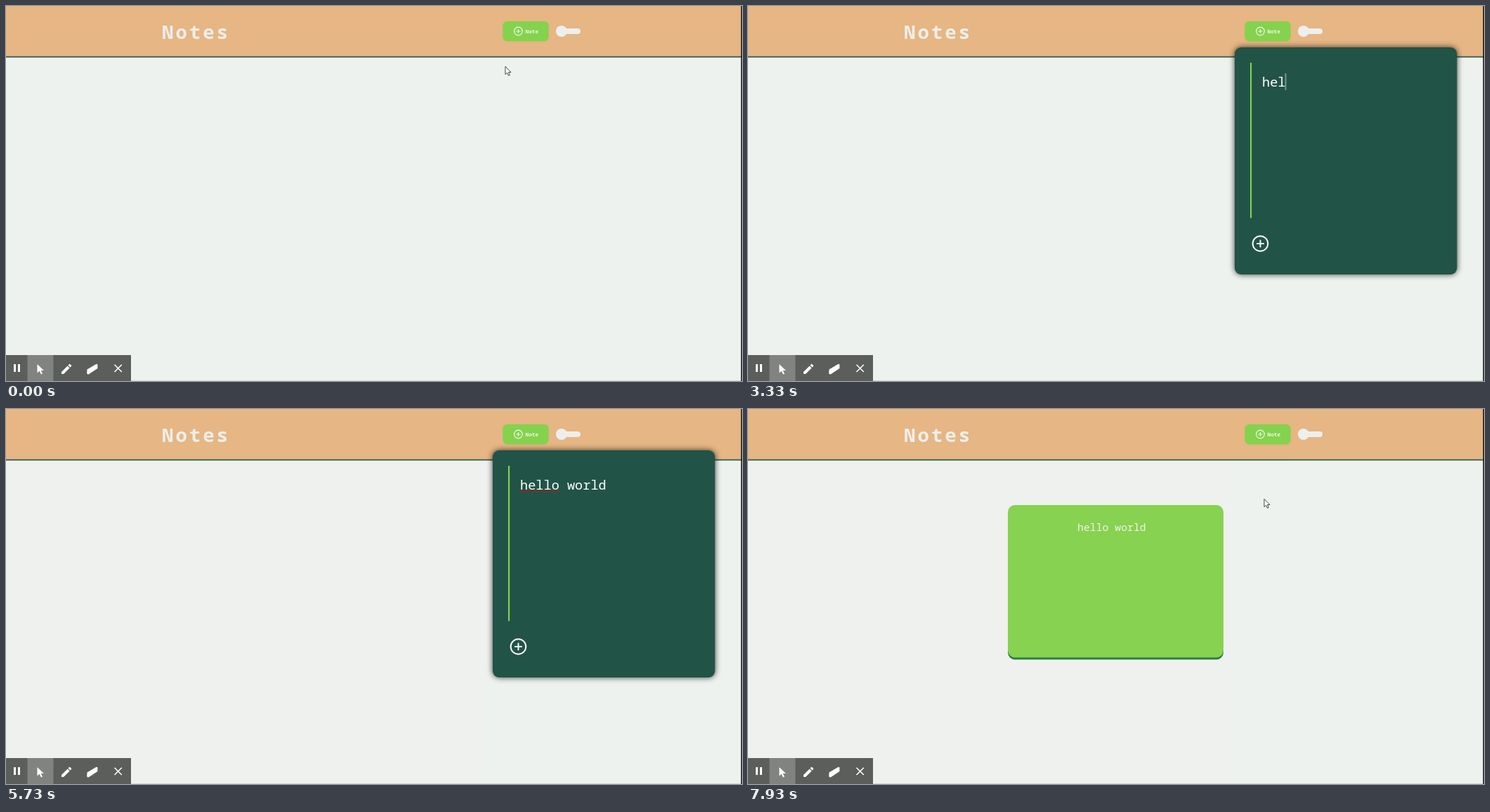
Animation of 1048x535 px, one loop 8000 ms. Source, as an HTML page:

```html
<!DOCTYPE html>
<html lang="en">
<head>
<meta charset="utf-8">
<title>Notes</title>
<style>
  html, body { margin: 0; width: 100%; height: 100%; overflow: hidden; background: #edf2ee; }
  svg { display: block; width: 100vw; height: 100vh; }
  text { font-family: "Noto Sans Mono", "DejaVu Sans Mono", monospace; white-space: pre; }

  /* Every animation shares one 8 s clock; 1% = 80 ms */
  .anim { animation: 8s step-end infinite; }
  .page { animation-name: page; }
  .bar { animation-name: bar; }
  .add { animation-name: add; }
  .icon { animation-name: icon; }
  .panel { animation-name: panel; }
  .type { animation-name: type; font-size: 18.6px; }
  .caret { animation-name: caret; }
  .spell { animation-name: spell; }
  .card { animation-name: card; }
  .ring-at { animation-name: ring-at; }
  .ring { animation-name: ring; animation-timing-function: linear; }
  .move { animation-name: move; animation-timing-function: ease-in-out; }
  .pointer { animation-name: pointer; }

  @keyframes page {
    0% { fill: #edf2ef }
    50% { fill: #f3f0f4 }
    58.5%, 100% { fill: #eff1ee }
  }
  @keyframes bar {
    0%, 58.5%, 100% { fill: #e6b684 }
    50% { fill: #e1b87a }
  }
  /* The button is shorter until its icon has loaded */
  @keyframes add {
    0%, 90%, 100% { transform: none }
    85.9% { transform: scaleY(.86) }
  }
  @keyframes icon {
    0%, 90%, 100% { visibility: visible }
    85.9% { visibility: hidden }
  }
  @keyframes panel {
    0%, 85.9%, 100% { visibility: hidden }
    6.6% { visibility: visible }
  }
  /* .6em is one character */
  @keyframes type {
    0% { transform: translateX(0) }
    34.1% { transform: translateX(.6em) }
    37.5% { transform: translateX(1.2em) }
    40.8% { transform: translateX(1.8em) }
    44.1% { transform: translateX(2.4em) }
    46.6% { transform: translateX(3em) }
    50% { transform: translateX(3.6em) }
    51.6% { transform: translateX(4.2em) }
    53.3% { transform: translateX(4.8em) }
    55.8% { transform: translateX(5.4em) }
    57.5% { transform: translateX(6em) }
    60%, 100% { transform: translateX(6.6em) }
  }
  @keyframes caret {
    0%, 27.5%, 66.2%, 78.7%, 100% { opacity: 0 }
    19.9%, 33.2%, 72.5% { opacity: 1 }
  }
  @keyframes spell {
    0% { opacity: 0 }
    50%, 100% { opacity: 1 }
  }
  @keyframes card {
    0%, 100% { visibility: hidden }
    91.6% { visibility: visible }
  }
  @keyframes ring-at {
    0% { transform: translate(735px, 37px) }
    12% { transform: translate(765px, 106px) }
    40%, 100% { transform: translate(730px, 339px) }
  }
  @keyframes ring {
    0%, 4.9%, 8.4%, 18.2%, 23.4%, 82.4%, 85.9%, 100% { opacity: 0 }
    5%, 7.6%, 18.3%, 22.5%, 82.5%, 85% { opacity: 1 }
  }
  @keyframes move {
    0%, .6% { transform: translate(711px, 86px) }
    4.6%, 11.6% { transform: translate(735px, 37px) }
    15.8%, 72% { transform: translate(765px, 106px) }
    81.6%, 91.6% { transform: translate(730px, 338px) }
    99.2%, 100% { transform: translate(735px, 128px) }
  }
  /* No arrow while it is over the text field */
  @keyframes pointer {
    0%, 79%, 100% { visibility: visible }
    14.4% { visibility: hidden }
  }

  .add { transform-origin: 740px 36px; }
  .box { filter: drop-shadow(0 0 4px rgba(0, 0, 0, .75)); }
</style>
</head>
<body>
<svg viewBox="0 0 1048 535" preserveAspectRatio="none">
  <defs>
    <clipPath id="typed">
      <rect class="anim type" x="532" y="90" width="200" height="36"/>
    </clipPath>
    <g id="plus" fill="none" stroke-linecap="round">
      <circle r="10.8"/>
      <path d="M-4.6 0H4.6M0 -4.6V4.6"/>
    </g>
  </defs>

  <rect width="1048" height="535" fill="#edf2ee"/>
  <rect class="anim page" y="73" width="688" height="462" fill="#edf2ef"/>

  <!-- header -->
  <rect class="anim bar" width="1048" height="72" fill="#e6b684"/>
  <rect y="71.7" width="1048" height="1.8" fill="#2f5c50"/>
  <text x="222" y="47" font-size="27.4" font-weight="700" letter-spacing="3" fill="#eeefec">Notes</text>
  <rect class="anim add" x="707.3" y="21.7" width="65.5" height="28.8" rx="6.5" fill="#85d24e"/>
  <g class="anim icon" stroke="#f1f7ec" stroke-width="2.2">
    <use href="#plus" transform="translate(729.5 36) scale(.54)"/>
  </g>
  <text x="739.6" y="39" font-size="7.7" font-weight="600" fill="#f1f7ec">Note</text>
  <g fill="#edefec">
    <rect x="789" y="32" width="29" height="8" rx="4"/>
    <circle cx="791" cy="36" r="8"/>
  </g>

  <!-- saved note -->
  <g class="anim card">
    <rect x="370" y="145" width="307" height="212.5" rx="10" fill="#2b7d43"/>
    <rect x="370" y="137" width="307" height="217.5" rx="10" fill="#87d250"/>
    <text x="469" y="174" font-size="14.8" fill="#edf5e8">hello world</text>
  </g>

  <!-- editor -->
  <g class="anim panel">
    <rect class="box" x="693" y="59" width="316.5" height="324" rx="9" fill="#225347"/>
    <rect x="715" y="81" width="2.2" height="221.5" fill="#84d050"/>
    <text x="732" y="114.5" font-size="18.6" fill="#fff" clip-path="url(#typed)">hello world</text>
    <path class="anim spell" d="M732 117H788" stroke="#9c2029" stroke-width="1.3"/>
    <g class="anim caret">
      <rect class="anim type" x="731.6" y="96" width="1" height="24" fill="#cbd8d3"/>
    </g>
    <use href="#plus" x="729.5" y="339" stroke="#f7faf8" stroke-width="2"/>
  </g>

  <!-- recorder bar -->
  <rect y="534" width="1048" height="1" fill="#d3d8d5"/>
  <rect y="498" width="178" height="37" fill="#5b5e5a"/>
  <rect x="30.5" y="498" width="37" height="37" fill="#80837f"/>
  <g fill="#fff">
    <path d="M11 511h3v11h-3zM17 511h3v11h-3z"/>
    <path d="M44.5 511V523.5L47.6 520.8L50 525.5L52 524.5L49.7 520H54Z"/>
    <path d="M79 525V522L87.6 513.4L90.6 516.4L82 525ZM88.5 512.5L90 511Q90.7 510.6 91.3 511L93 512.7Q93.4 513.3 93 514L91.5 515.5Z"/>
    <path d="M115.5 518.5L128.5 510.7Q130.4 510.4 130.4 512V517L118 525.3Q115.2 526 115.2 523.5Z"/>
  </g>
  <path d="M154.5 511.7L164.8 522M164.8 511.7L154.5 522" stroke="#fff" stroke-width="1.6"/>

  <rect x="1046.6" width="1.4" height="535" fill="#111"/>

  <!-- click mark and mouse -->
  <g class="anim ring-at">
    <circle class="anim ring" r="25" fill="none" stroke="#8b1520" stroke-width="2.6"/>
  </g>
  <g class="anim move">
    <path class="anim pointer" d="M0 .3V11.6L2.7 9.2L4.5 13.3L6.4 12.5L4.6 8.5H8Z" fill="#fff" stroke="#333" stroke-width=".9"/>
  </g>
</svg>
</body>
</html>
```
